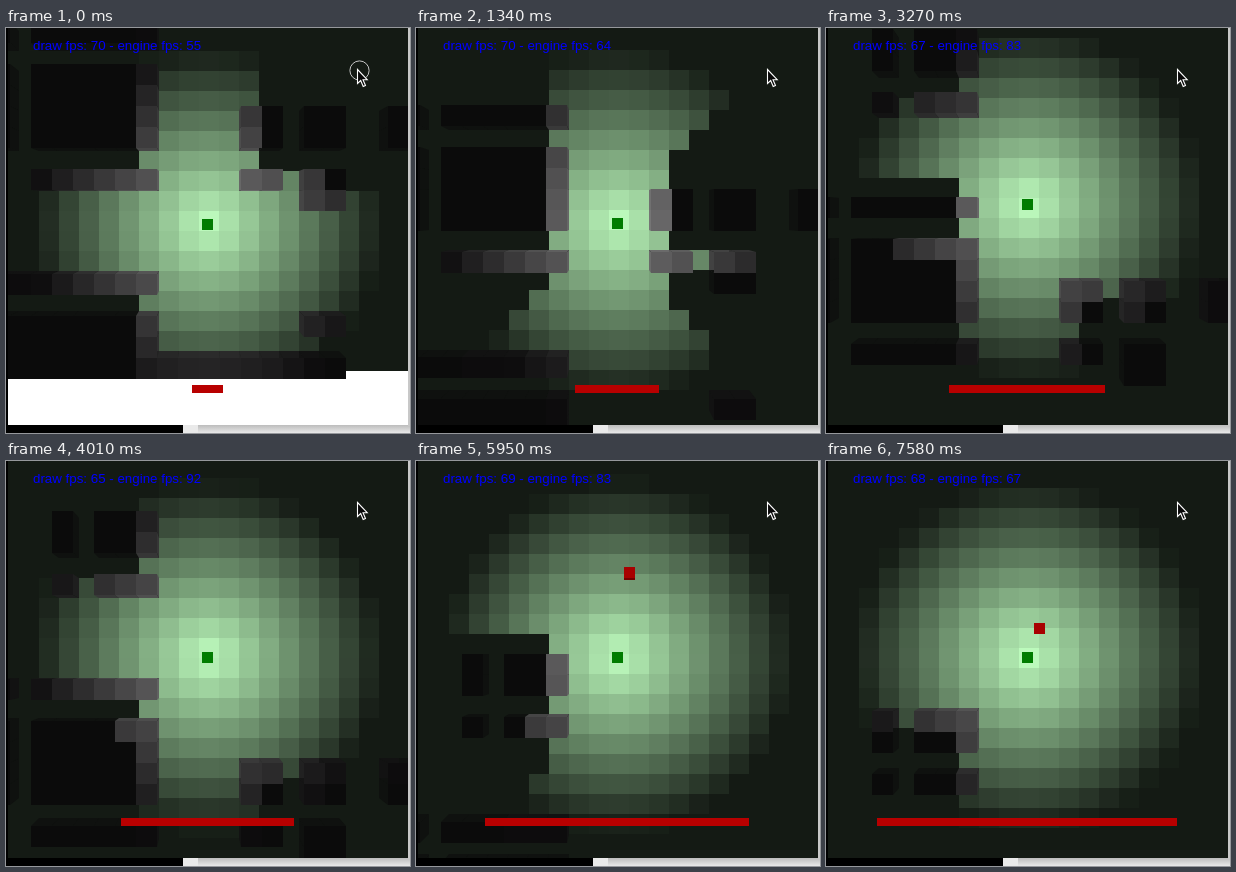
Recreate the animation shown at these times as an HTML page with a canvas. Size 404x405 px, loop 8000 ms.

```html
<!DOCTYPE html>
<html lang="en">
<head>
<meta charset="utf-8">
<title>Light and walls</title>
<style>
html, body { margin: 0; width: 100%; height: 100%; overflow: hidden; background: #000; }
canvas { display: block; }
</style>
</head>
<body>
<canvas id="view" width="404" height="405"></canvas>
<script>
const ctx = document.getElementById('view').getContext('2d');
const LOOP = 8000, STEP = 148.6;
const TILE = 20, LEFT = 33, TOP = 3, LAST_ROW = 16;
const EYE = { x: 202, y: 192 }, RISE = 1.05;
const RADIUS = 174, REST = 196;
const SPEED = 0.143, FOLLOW = 0.007;

// Walks: start time, distance
const WALKS = [[352, 80], [2517, 134], [4466, 136], [6650, 54]];

const clamp = (v, a, b) => Math.max(a, Math.min(b, v));
const within = (v, a, b) => v >= a && v <= b;
const mix = (a, b, f) => Math.round(a + (b - a) * f);
const snap = v => Math.round(v + 0.1);
const lift = (v, eye, k = RISE) => Math.round(eye + (v - eye) * k);
const noise = n => Math.abs(Math.sin(n) * 1e4 % 1);

// The village: houses left of the street, sheds on its right
function isWall(c, r) {
  if (!within(r, -8, LAST_ROW)) return false;
  if (c <= 5) {
    if (r < 0) return (r === -5 || r < -6) && (c === 1 || c >= 3);
    if (r >= 12) return r !== 13;
    if (r === 7) return c >= 0;
    return (r === 0 || within(r, 2, 5)) && c !== -1;
  }
  const shop = within(c, 10, 11), shed = within(c, 13, 14);
  if (r === LAST_ROW) return c <= 14;
  if (within(r, 4, 5)) return shop || shed || c >= 17;
  if (r === 7) return shop || shed;
  return shed && (r === 8 || r === 14);
}

function rect(x, y, w, h, fill) {
  ctx.fillStyle = fill;
  ctx.fillRect(x, y, w, h);
}

function poly(points, fill) {
  ctx.beginPath();
  points.forEach(([x, y]) => ctx.lineTo(x, y));
  ctx.closePath();
  ctx.fillStyle = fill;
  ctx.fill();
}

// Distance walked, and how far the camera trails behind
function walk(t) {
  let gone = 0, lag = 0;
  for (const [start, length] of WALKS) {
    const span = length / SPEED, run = clamp(t - start, 0, span);
    gone += run * SPEED;
    lag += SPEED / FOLLOW * (1 - Math.exp(-FOLLOW * run)) * Math.exp(-FOLLOW * Math.max(0, t - start - span));
  }
  return { gone, lag };
}

// The ray runs to the point of the cell nearest to the lamp
function sees(lamp, x, y, shift) {
  const dx = clamp(lamp.x, x, x + TILE) - lamp.x;
  const dy = clamp(lamp.y, y, y + TILE) - lamp.y;
  const n = Math.ceil(Math.hypot(dx, dy));
  for (let i = 1; i < n; i++) {
    const c = Math.floor((lamp.x + dx * i / n - LEFT) / TILE);
    const r = Math.floor((lamp.y + dy * i / n - TOP - shift) / TILE);
    if (isWall(c, r)) return false;
  }
  return true;
}

function lightAt(lamp, c, r, shift, reach) {
  const x = LEFT + c * TILE, y = TOP + r * TILE + shift;
  const d = Math.hypot(x + TILE / 2 - lamp.x, y + TILE / 2 - lamp.y);
  return d < reach && sees(lamp, x, y, shift) ? Math.max(0.02, 1 - d / RADIUS) : 0;
}

function drawFloorCell(lamp, c, r, shift) {
  const f = lightAt(lamp, c, r, shift, RADIUS);
  if (f) rect(LEFT + c * TILE, TOP + r * TILE + shift, TILE, TILE,
    `rgb(${mix(20, 190, f)},${mix(26, 252, f)},${mix(20, 190, f)})`);
}

// Paints the sides facing the eye and returns the raised top
function drawSides(lamp, c, r, shift) {
  const x = LEFT + c * TILE, y = TOP + r * TILE + shift, x2 = x + TILE, y2 = y + TILE;
  const f = lightAt(lamp, c, r, shift, 215);
  const a = lift(x, EYE.x), b = lift(x2, EYE.x), p = lift(y, EYE.y), q = lift(y2, EYE.y);
  const grey = mix(11, 131, f), edge = mix(15, 148, f);
  const side = `rgb(${edge},${edge + (f ? 0 : 2)},${edge})`;
  if (b < x2) poly([[x2, y], [b, p], [b, q], [x2, y2]], side);
  if (a > x) poly([[x, y], [a, p], [a, q], [x, y2]], side);
  if (q < y2) poly([[x, y2], [a, q], [b, q], [x2, y2]], side);
  if (p > y) poly([[x, y], [a, p], [b, p], [x2, y]], side);
  return [a, p, b - a, q - p, `rgb(${grey},${Math.max(11, grey - 1)},${grey})`];
}

function drawWorld(lamp, shift) {
  const first = Math.floor((-TOP - shift) / TILE) - 1;
  const last = Math.min(LAST_ROW, first + 22);
  const walls = [];
  for (let r = first; r <= last; r++)
    for (let c = -2; c < 20; c++) {
      if (isWall(c, r)) walls.push([c, r]);
      else drawFloorCell(lamp, c, r, shift);
    }
  const tops = walls.map(([c, r]) => drawSides(lamp, c, r, shift));
  tops.forEach(top => rect(...top));
}

function drawFoe(lamp, shift) {
  const y = -236 + shift, r = Math.floor((y - TOP - shift) / TILE);
  if (!lightAt(lamp, 8, r, shift, RADIUS)) return;
  const top = lift(y, 198, 1.033) - 5, foot = y + 5;
  rect(208, top, 11, Math.max(11, foot - top), '#760000');
  rect(208, top, 11, 11, '#a80000');
}

function drawReadout(shift) {
  const fps = 70 - Math.floor(6 * noise(shift));
  const engine = 55 + Math.floor(40 * noise(shift * 2));
  ctx.fillStyle = '#00f';
  ctx.font = '13.333px "Liberation Sans", Arial, sans-serif';
  ctx.fillText(`draw fps: ${fps} - engine fps: ${engine}`, 27, 22);
}

function drawCursor(ring) {
  if (ring) {
    ctx.beginPath();
    ctx.arc(353.5, 42.5, 9.6, 0, Math.PI * 2);
    ctx.strokeStyle = '#c4c4c4';
    ctx.lineWidth = 1;
    ctx.stroke();
  }
  const arrow = [[0, 0], [0, 14], [3.2, 11], [5.7, 17], [8, 16], [5.5, 10.2], [9.7, 10.2]];
  poly(arrow.map(([x, y]) => [351.5 + x, 41.5 + y]), '#080808');
  ctx.strokeStyle = '#fff';
  ctx.lineWidth = 1.1;
  ctx.stroke();
}

function drawDesk() {
  rect(0, 0, 404, 405, '#000');
  const shade = ctx.createLinearGradient(0, 397, 0, 405);
  shade.addColorStop(0, '#bcbcbc');
  shade.addColorStop(1, '#e8e8e8');
  rect(177, 397, 15, 8, '#eaeaea');
  rect(192, 397, 212, 8, shade);
  rect(402, 0, 2, 398, '#c8c8c8');
}

function draw(time) {
  const n = Math.floor(time / STEP + 0.05);
  const { gone, lag } = walk(n * STEP);
  const shift = snap(gone - lag), lamp = { x: 202, y: REST - lag };

  drawDesk();
  ctx.save();
  ctx.beginPath();
  ctx.rect(2, 0, 400, 397);
  ctx.clip();
  rect(2, 0, 400, 397, '#fff');
  rect(2, 0, 400, TOP + (LAST_ROW + 1) * TILE + shift, '#141a14');
  drawWorld(lamp, shift);
  drawFoe(lamp, shift);
  rect(196, snap(REST - 5 - lag), 11, 11, '#007c00');

  const bar = Math.round(30.5 + gone * 2 / 3);
  rect(Math.floor(201.5 - bar / 2), 357, bar, 8, '#b80000');
  drawReadout(shift);
  ctx.restore();
  drawCursor(n === 0);
}

const begin = performance.now();
function tick() {
  draw((performance.now() - begin) % LOOP);
  requestAnimationFrame(tick);
}
tick();
</script>
</body>
</html>
```
